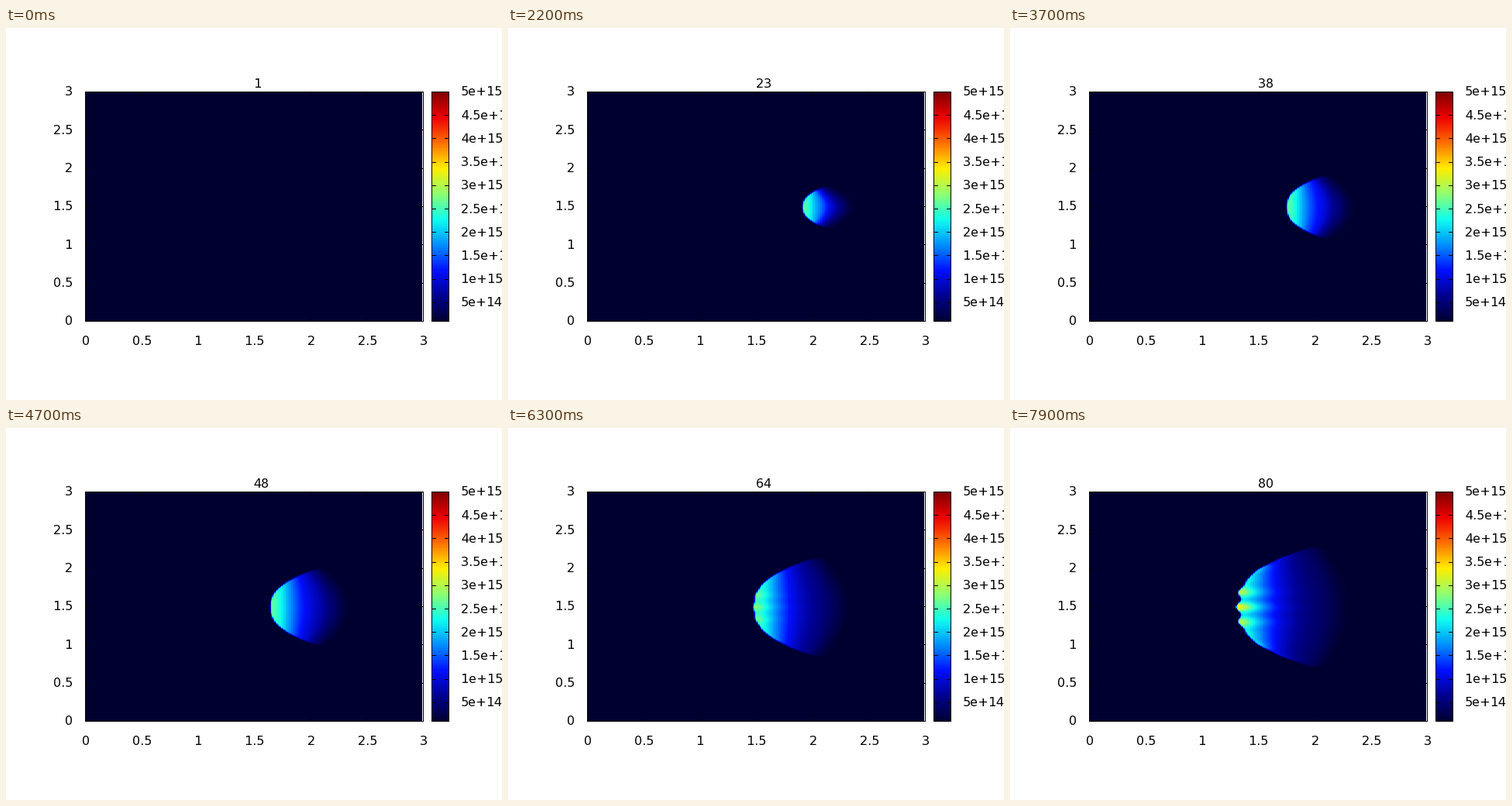
Animation, 640 px wide and 480 px high, one loop 8 s. Source, as a matplotlib script:

```python
import numpy as np
import matplotlib.pyplot as plt
from matplotlib.animation import FuncAnimation
from matplotlib.colors import LinearSegmentedColormap

W, H, DPI = 640, 480, 100
FRAMES, STEP_MS = 80, 100
LEFT, RIGHT, TOP, BOTTOM = 102, 538, 82, 378
BAR_L, BAR_R = 549, 571
LOW, HIGH = 0.1, 5.0  # density range in 1e15
CELLS = 299
TICK = 5

PX = 72 / DPI
FONT = 16 * PX
plt.rcParams["font.family"] = "DejaVu Sans"
plt.rcParams["text.hinting_factor"] = 1  # whole-pixel glyph advances

palette = LinearSegmentedColormap.from_list("density", [
    "#000030", "#000090", "#000fff", "#0090ff", "#0fffee",
    "#90ff70", "#ffee00", "#ff7000", "#ee0000", "#7f0000"], N=512)

# Cell centres in stage pixels
xs = LEFT + (np.arange(CELLS) + 0.5) * (RIGHT - 1 - LEFT) / CELLS
ys = TOP + 1 + (np.arange(CELLS) + 0.5) * (BOTTOM - TOP) / CELLS
X, Y = np.meshgrid(xs, ys)
OFF = np.abs(Y - 231)


def smooth(a):
    a = np.clip(a, 0, 1)
    return a * a * (3 - 2 * a)


def bump(a, centre, width):
    return np.exp(-((a - centre) / width) ** 2)


def density(n):
    """Streamer head drifting left, leaving a decaying channel behind."""
    speed = 1.555
    tip = 416 - speed * n
    shoulder = 417 - 0.25 * n
    half = 7 + 0.91 * n
    span = shoulder - tip
    rel = OFF / half

    # Branching of the head late in the run
    split = max(0, (n - 55) / 25) ** 1.5
    wave = np.cos(2 * np.pi * OFF / (0.255 * half))
    window = np.exp(-(OFF / (0.37 * half)) ** 4)
    side = bump(rel, 0.61, 0.07) + 0.5 * bump(rel, 0.79, 0.06)

    front = tip + span * rel ** 2.5
    front = front + split * (3 * (1 - wave) * window - 2 * side)
    slope = 2.5 * span / half * rel ** 1.5
    inside = (X - front) / np.sqrt(1 + slope ** 2)
    edge = smooth(inside / 3.5 + 0.5)

    back = np.maximum(X - shoulder, 0) / (452 - shoulder)
    rear = smooth((1 - back ** 2 - rel ** 2) / 0.12)

    # Attachment and recombination, delayed as the head grows
    tail = np.maximum(X + 26 * np.minimum(rel, 1.2) ** 2 - 404, 0)
    start = 2.6 * np.exp(-(tail / 25) ** 1.8) + 1e-6
    arrival = np.maximum(416 - X, 0) / speed
    age = np.maximum(n - arrival, 0)
    lag = 0.18 * arrival + 1e-6
    age = age - lag * (1 - np.exp(-age / lag))
    fade = np.exp(-0.018 * age)
    v = fade / (1 / start + 0.008 * (1 - fade) / 0.018)
    v = v * (1 - 0.35 * np.minimum(rel, 1) ** 2 * smooth((X - tip) / span))

    trail = np.exp(-np.maximum(X - tip, 0) / 20)
    v = v + split * window * trail * (0.7 * wave + 0.15 + 0.2 * bump(OFF, 0, 6))
    v = v + split * 0.4 * side * np.exp(-np.maximum(X - front, 0) / 9)

    growth = min(1, (n - 1) / 6) ** 1.5
    return growth * v * edge * rear


fig = plt.figure(figsize=(W / DPI, H / DPI), dpi=DPI, facecolor="white")
ax = fig.add_axes([0, 0, 1, 1])
ax.axis("off")


def line(x0, y0, x1, y1):
    ax.plot([x0 + 0.5, x1 + 0.5], [y0 + 0.5, y1 + 0.5], color="black",
            lw=PX, solid_capstyle="projecting", snap=False, zorder=3)


def frame(x0, y0, x1, y1):
    line(x0, y0, x1, y0)
    line(x0, y1, x1, y1)
    line(x0, y0, x0, y1)
    line(x1, y0, x1, y1)


def label(x, y, text):
    return ax.text(x, y, text, size=FONT, ha="left", va="baseline",
                   color="black")


def advance(text):
    return sum(5 if c == "." else 10 for c in text)


def baseline(y):
    return round(y + 5.48)


field = ax.imshow(np.zeros((CELLS, CELLS)), cmap=palette, vmin=LOW, vmax=HIGH,
                  extent=[LEFT, RIGHT - 1, BOTTOM + 1, TOP + 1],
                  interpolation="nearest", aspect="auto")
ax.imshow(np.linspace(1, 0, BOTTOM - TOP + 1)[:, None], cmap=palette,
          vmin=0, vmax=1, extent=[BAR_L, BAR_R + 1, BOTTOM + 1, TOP],
          interpolation="nearest", aspect="auto")
ax.set_xlim(0, W)
ax.set_ylim(H, 0)

frame(LEFT, TOP, RIGHT, BOTTOM)
frame(BAR_L, TOP, BAR_R, BOTTOM)

for k in range(7):
    value = k / 2
    x = LEFT + (RIGHT - LEFT) * value / 3
    y = BOTTOM - (BOTTOM - TOP) * value / 3
    col, row = round(x), round(y)
    line(col, TOP, col, TOP + TICK)
    line(col, BOTTOM, col, BOTTOM - TICK)
    line(LEFT, row, LEFT + TICK, row)
    line(RIGHT, row, RIGHT - TICK, row)
    text = f"{value:g}"
    label(round(x - advance(text) / 2 + 1), 409, text)
    label(86 - advance(text), baseline(y), text)

for k in range(1, 11):
    value = k / 2
    y = BOTTOM - (BOTTOM - TOP) * (value - LOW) / (HIGH - LOW)
    row = round(y)
    line(BAR_L, row, BAR_L + TICK, row)
    line(BAR_R, row, BAR_R - TICK, row)
    text = f"{value:g}e+15" if value >= 1 else f"{value * 10:g}e+14"
    label(587, baseline(y), text)

title = label(320, 77, "1")


def update(i):
    n = i + 1
    title.set_text(str(n))
    field.set_data(density(n))
    return field, title


anim = FuncAnimation(fig, update, frames=FRAMES, init_func=lambda: update(0),
                     interval=STEP_MS, repeat=True, repeat_delay=0, blit=False)
plt.show()
```
